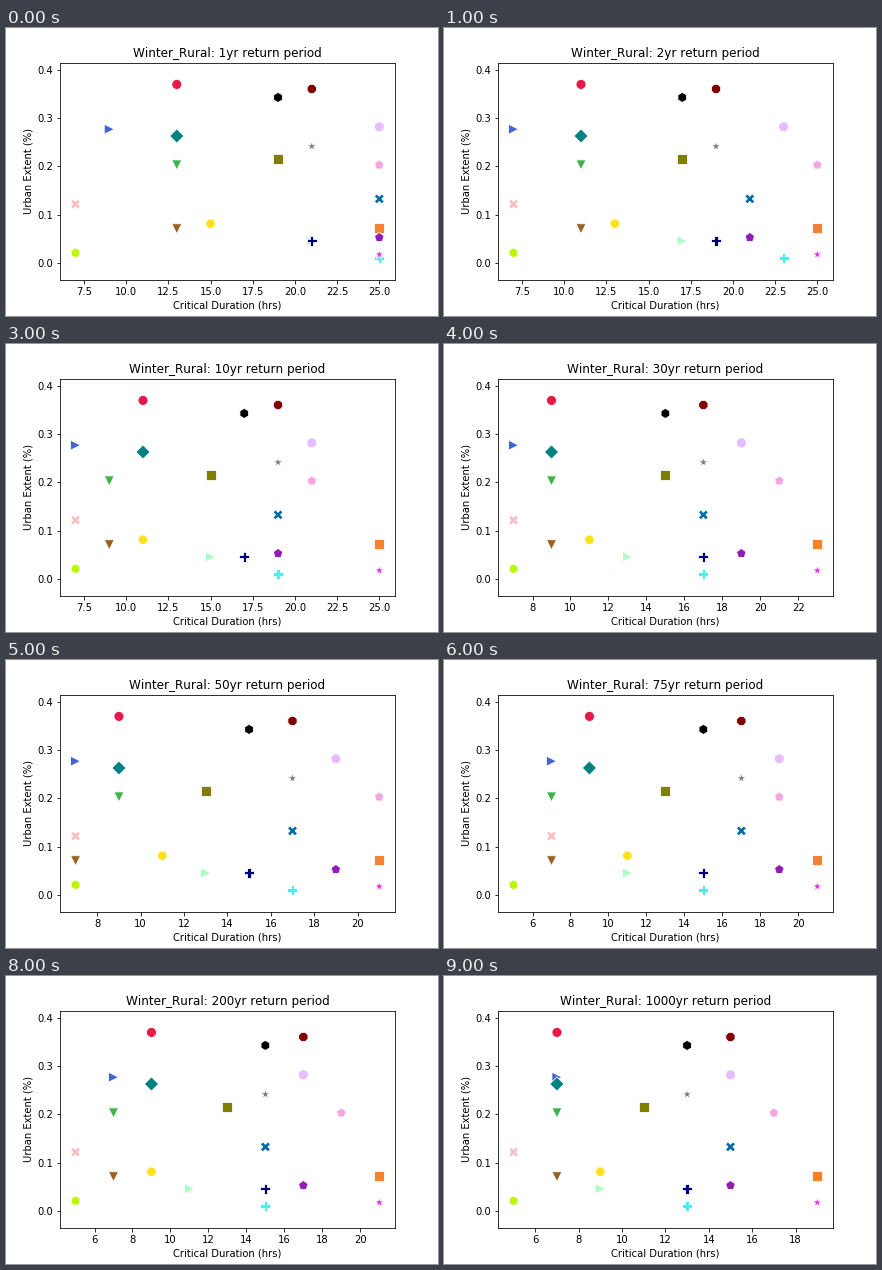
Write a matplotlib script that moves like this. It is 432 px wide and 288 px high and loops after 10000 ms.

```python
from itertools import cycle

import numpy as np
import matplotlib.pyplot as plt
from matplotlib.animation import FuncAnimation
from matplotlib.markers import MarkerStyle

PERIODS = [1, 2, 5, 10, 30, 50, 75, 100, 200, 1000]
MARKERS = "ov8>spP*hXD"
LONGEST = 25  # hrs

# colour, urban extent, duration at a 2yr storm, hours lost per decade
SITES = [
    ("#e6194b", 0.3700, 11.60, 1.50),
    ("#3cb44b", 0.2030, 11.05, 1.65),
    ("#ffe119", 0.0810, 13.75, 1.90),
    ("#4363d8", 0.2770, 7.80, 0.50),
    ("#f58231", 0.0720, 26.84, 2.90),
    ("#911eb4", 0.0525, 22.04, 2.15),
    ("#46f0f0", 0.0095, 22.28, 3.40),
    ("#f032e6", 0.0170, 26.84, 2.90),
    ("#bcf60c", 0.0205, 7.07, 0.60),
    ("#fabebe", 0.1215, 7.25, 0.60),
    ("#008080", 0.2630, 11.60, 1.50),
    ("#e6beff", 0.2820, 22.15, 2.10),
    ("#9a6324", 0.0705, 10.54, 1.51),
    ("#800000", 0.3605, 19.60, 1.50),
    ("#aaffc3", 0.0455, 17.25, 2.85),
    ("#808000", 0.2145, 16.50, 1.60),
    ("#f4a6e0", 0.2030, 24.10, 2.30),
    ("#000075", 0.0455, 18.50, 1.60),
    ("#808080", 0.2415, 19.95, 2.00),
    ("#000000", 0.3430, 17.60, 1.50),
    ("#006b9f", 0.1325, 21.52, 2.50),
]
colors, extent, base, rate = (np.array(col) for col in zip(*SITES))


def marker_path(marker):
    style = MarkerStyle(marker)
    return style.get_path().transformed(style.get_transform())


paths = [marker_path(m) for m, _ in zip(cycle(MARKERS), SITES)]

plt.rcParams["font.family"] = "DejaVu Sans"
plt.rcParams["text.kerning_factor"] = 6
fig = plt.figure(figsize=(6, 4), dpi=72, facecolor="white")
ax = fig.add_axes([0.125, 0.125, 0.775, 0.755])


def durations(period):
    """Odd number of hours, shrinking with the log of the return period."""
    hours = base - rate * np.log10(period - 0.9)
    return np.minimum(2 * np.floor(hours / 2) + 1, LONGEST)


def limits(values, pixels):
    """Data range widened by the marker radius, then by a 5% margin."""
    pad = 5.4 / pixels
    lo, hi = values.min() - pad, values.max() + pad
    margin = 0.05 * (hi - lo)
    return lo - margin, hi + margin


def draw(step):
    ax.clear()
    hours = durations(PERIODS[step])
    dots = ax.scatter(hours, extent, s=100, c=colors,
                      edgecolors="white", linewidths=0.8)
    dots.set_paths(paths)
    ax.set_xlim(limits(hours, ax.bbox.width))
    ax.set_ylim(limits(extent, ax.bbox.height))
    ax.set_yticks(np.arange(5) / 10)
    ax.set_xlabel("Critical Duration (hrs)")
    ax.set_ylabel("Urban Extent (%)")
    ax.set_title(f"Winter_Rural: {PERIODS[step]}yr return period")
    return []


anim = FuncAnimation(fig, draw, frames=len(PERIODS), interval=1000,
                     init_func=lambda: draw(0), repeat=True, repeat_delay=0)
plt.show()
```
